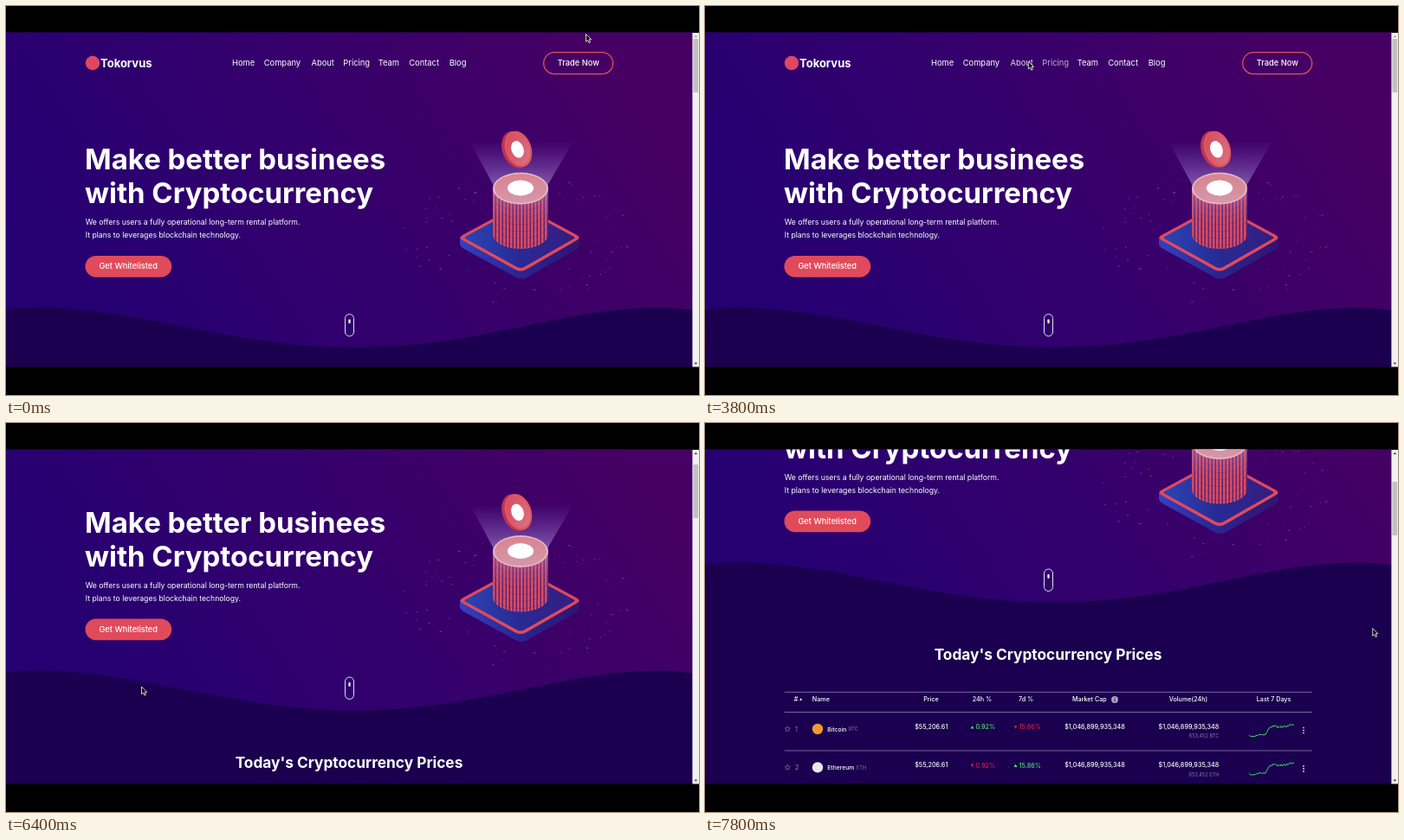
These frames come from a looping animation (800x450 px, 8000 ms). An HTML page:

```html
<!DOCTYPE html>
<html lang="en">
<head>
<meta charset="utf-8">
<title>Crypto landing page</title>
<style>
  html, body { margin: 0; width: 100%; height: 100%; overflow: hidden; background: #000; }
  svg { display: block; width: 800px; height: 450px; }
  text { font-family: Inter, "Open Sans", sans-serif; fill: #fff; }
  .nav text { font-size: 9.4px; }
  .title { font-size: 32.95px; font-weight: 700; }
  .lead { font-size: 8.69px; }
  .label { font-size: 9.25px; font-weight: 500; text-anchor: middle; }
  .table text { font-size: 7.2px; font-weight: 500; }
  .table .name { font-size: 6.75px; }
  .table .small { font-size: 5.6px; font-weight: 400; fill: #8678ab; }
  .table .mid { text-anchor: middle; }
  .table .end { text-anchor: end; }
  .table .up { fill: #4fe06c; }
  .table .down { fill: #d51f49; }
</style>
</head>
<body>
<svg viewBox="0 0 800 450">
  <defs>
    <clipPath id="view"><rect y="30.6" width="793" height="387"/></clipPath>
    <linearGradient id="sky" gradientUnits="userSpaceOnUse" x1="90" y1="390" x2="660" y2="10">
      <stop offset="0" stop-color="#240072"/>
      <stop offset=".5" stop-color="#34006c"/>
      <stop offset="1" stop-color="#460063"/>
    </linearGradient>
    <linearGradient id="beam" x2="0" y2="1">
      <stop offset="0" stop-color="#a98af0" stop-opacity=".02"/>
      <stop offset="1" stop-color="#cdbcf5" stop-opacity=".5"/>
    </linearGradient>
    <linearGradient id="haze" x2="0" y2="1">
      <stop offset="0" stop-color="#b9a0d8" stop-opacity=".4"/>
      <stop offset=".6" stop-color="#8a60b0" stop-opacity="0"/>
    </linearGradient>
    <linearGradient id="deck">
      <stop offset="0" stop-color="#2a44b4"/>
      <stop offset=".5" stop-color="#282a94"/>
      <stop offset="1" stop-color="#351c80"/>
    </linearGradient>
    <linearGradient id="side">
      <stop offset="0" stop-color="#3440c0"/>
      <stop offset=".5" stop-color="#2a2490"/>
      <stop offset="1" stop-color="#301470"/>
    </linearGradient>
    <linearGradient id="coin" x2=".7" y2="1">
      <stop offset="0" stop-color="#d4495c"/>
      <stop offset="1" stop-color="#d97080"/>
    </linearGradient>
    <linearGradient id="lid" x2="0" y2="1">
      <stop offset="0" stop-color="#d9838f"/>
      <stop offset="1" stop-color="#d598ab"/>
    </linearGradient>
    <pattern id="ribs" width="4" height="8" patternUnits="userSpaceOnUse" x="562">
      <rect width="4" height="8" fill="#5c2474"/>
      <rect width="2.5" height="8" fill="#dc4c60"/>
    </pattern>
  </defs>

  <g clip-path="url(#view)">
    <g id="page">
      <rect y="30" width="793" height="641" fill="#1a004e"/>
      <path fill="url(#sky)" d="M0 30H793V352Q772 349 750 349C640 350 545 395 405 395S170 354 52 349Q30 348 0 351Z"/>

      <g id="dust"></g>

      <g stroke-linejoin="round">
        <path d="M524 267V276Q525 279 529 281L589 314Q595 317 601 314L658 282Q662 279 662 276V267Z" fill="url(#side)"/>
        <path d="M527 265L588 232Q593 229 598 232L659 265Q664 268 659 271L600 305Q594 308 588 305L527 271Q522 268 527 265Z" fill="#e04a5c"/>
        <path d="M531 266.5L589 235Q593 233 597 235L655 266.5Q658 268 655 269.5L598 302Q594 304 590 302L531 269.5Q528 268 531 266.5Z" fill="url(#deck)"/>
        <path d="M562 211V264A32 17 0 0 0 626 264V211Z" fill="url(#ribs)"/>
        <g id="seams" fill="none" stroke="#5c2274" stroke-width=".7" opacity=".4"></g>
        <path d="M562 211V264A32 17 0 0 0 626 264V211Z" fill="url(#haze)"/>
        <ellipse cx="594" cy="211" rx="32" ry="18.5" fill="#e6b9c6"/>
        <ellipse cx="594" cy="211" rx="30" ry="16.8" fill="url(#lid)"/>
        <ellipse cx="594" cy="210.5" rx="15" ry="9" fill="#fff"/>
        <path d="M562 211V206L536 158H654L626 206V211A32 18.5 0 0 0 562 211Z" fill="url(#beam)"/>
        <g transform="rotate(-20 590 166)">
          <ellipse cx="588.5" cy="165.5" rx="15.5" ry="22" fill="#b93455"/>
          <ellipse cx="591.5" cy="166" rx="15" ry="21.5" fill="#e25560"/>
          <ellipse cx="591.5" cy="166" rx="12.8" ry="19" fill="url(#coin)"/>
          <ellipse cx="590.5" cy="166" rx="7" ry="10" fill="#fff"/>
        </g>
      </g>

      <circle cx="100" cy="66" r="8.2" fill="#df4760"/>
      <text x="109" y="71" font-size="13" font-weight="700">Tokorvus</text>
      <g id="nav" class="nav"></g>
      <rect x="620.7" y="53.7" width="80" height="25" rx="12.5" fill="none" stroke="#e0515d" stroke-width="1.3"/>
      <text class="label" x="660.8" y="69">Trade Now</text>

      <text class="title" x="91" y="189">Make better businees</text>
      <text class="title" x="91" y="228">with Cryptocurrency</text>
      <text class="lead" x="91.7" y="253.3">We offers users a fully operational long-term rental platform.</text>
      <text class="lead" x="91.7" y="268">It plans to leverages blockchain technology.</text>
      <rect x="91.5" y="289" width="99.7" height="24.7" rx="12.35" fill="#e14a5a"/>
      <text class="label" x="141.2" y="304.3">Get Whitelisted</text>

      <rect x="391.5" y="356.5" width="10" height="25.5" rx="5" fill="none" stroke="#e6dff5"/>
      <rect x="395.4" y="362.5" width="2.2" height="4.8" rx=".8" fill="#fff"/>

      <text x="396" y="461.7" font-size="17.3" font-weight="700" text-anchor="middle">Today's Cryptocurrency Prices</text>
      <g id="table" class="table" transform="translate(0 187.5)"></g>
    </g>
  </g>

  <rect x="792.4" y="31" width="7.6" height="386.5" fill="#f1f1f1"/>
  <rect id="thumb" x="793.5" y="38" width="5.6" height="62" fill="#c1c1c1"/>
  <path id="upArrow" d="M794.3 36.3L796.3 33.8L798.3 36.3Z"/>
  <path d="M794.3 412.6L796.3 415.1L798.3 412.6Z" fill="#505050"/>
  <path id="cursor" d="M0 0V8.7L2 6.9 3.4 10 4.9 9.4 3.6 6.3H6.2Z" fill="#080808" stroke="#fff" stroke-width=".8"/>
</svg>

<script>
const LOOP = 8000, STEP = 100;
const $ = id => document.getElementById(id);

const links = [
  ['Home', 261], ['Company', 297.7], ['About', 352.5], ['Pricing', 389.3],
  ['Team', 429.7], ['Contact', 465.2], ['Blog', 511.7]
];

// [ms, x, y]
const pointer = [
  [0, 669.5, 32.5], [200, 671, 42], [500, 668, 60], [900, 654, 66],
  [1100, 622, 67], [1300, 556, 65], [1500, 510.3, 63.5], [1800, 508.5, 63.5],
  [2200, 485, 64], [2500, 452, 65], [2700, 430, 65.5], [3000, 424.6, 65.2],
  [3200, 418, 65], [3600, 396, 64.5], [3900, 362, 64], [4200, 318, 64],
  [4500, 268, 64], [4600, 266, 65], [4700, 262, 80], [4900, 245.3, 157],
  [5100, 205, 232], [5400, 150, 304], [5500, 150, 304], [5800, 156.5, 305],
  [6400, 156.5, 305], [6600, 235, 298], [6900, 560, 262], [7100, 752, 241],
  [7300, 770.7, 237.5]
];

// [ms, offset]
const scroll = [
  [6100, 0], [6200, 24], [6300, 55], [6400, 62.5],
  [7400, 62.5], [7500, 84], [7600, 138], [7700, 177], [7800, 187.5]
];

function at(track, t, col) {
  const i = track.findIndex(k => k[0] > t);
  if (i < 0) return track[track.length - 1][col];
  if (i === 0) return track[0][col];
  const a = track[i - 1], b = track[i];
  return a[col] + (b[col] - a[col]) * (t - a[0]) / (b[0] - a[0]);
}

function random(seed) {
  return () => (seed = (seed * 16807) % 2147483647) / 2147483647;
}

function drawDust() {
  const rnd = random(77);
  let out = '';
  for (let i = 0; i < 75; i++) {
    const a = rnd() * Math.PI * 2, r = .62 + rnd() * .4;
    const x = 592 + Math.cos(a) * r * 134, y = 270 + Math.sin(a) * r * 74;
    const w = .8 + rnd() * 2;
    out += `<rect x="${x}" y="${y}" width="${w}" height="1.1" fill="${rnd() < .4 ? '#b04a8c' : '#7550b8'}" opacity="${.3 + rnd() * .5}"/>`;
  }
  $('dust').innerHTML = out;
}

function drawSeams() {
  let out = '';
  for (let y = 220; y < 264; y += 8) out += `<path d="M562 ${y}A32 17 0 0 0 626 ${y}"/>`;
  $('seams').innerHTML = out;
}

const label = (x, y, str, cls = '') => `<text x="${x}" y="${y}" class="${cls}">${str}</text>`;
const rule = y => `<path d="M91.7 ${y}H701" stroke="#8e80b6" stroke-width=".8"/>`;

function change(x, y, value, up) {
  const cls = up ? 'up' : 'down';
  const mark = up ? 'l2 -3.4 2 3.4z' : 'm0 -3.4l2 3.4 2 -3.4z';
  return `<path class="${cls}" d="M${x} ${y - .8}${mark}" fill="${up ? '#4fe06c' : '#d51f49'}"/>` + label(x + 6, y, value, cls);
}

function sparkline(x, y) {
  const rnd = random(41);
  let d = '';
  for (let i = 0; i <= 52; i++) {
    const base = 15 - i * .08 - 9 / (1 + Math.exp(22 - i)) + (i > 32 && i < 44 ? 1.4 : 0);
    d += (i ? 'L' : 'M') + (x + i) + ' ' + (y + base + (rnd() - .5) * 2.2).toFixed(1);
  }
  return `<path d="${d}" fill="none" stroke="#45d467" stroke-width="1"/>`;
}

function row(n, y, name, code, color, codeX, dayUp) {
  const star = 'm0 -3.2l.9 2 2.2 .2-1.7 1.5.5 2.2-1.9-1.2-1.9 1.2.5-2.2-1.7-1.5 2.2-.2z';
  const dots = [-3, 0, 3].map(d => `<circle cx="691" cy="${y + 1.5 + d}" r=".85" fill="#fff"/>`).join('');
  const big = '$1,046,899,935,348';
  return `<path d="M95.3 ${y}${star}" fill="none" stroke="#8173a6" stroke-width=".7"/>` +
    `<text x="104" y="${y + 2.5}" style="fill:#9789b9;font-weight:400">${n}</text>` +
    `<circle cx="130" cy="${y}" r="6.2" fill="${color}"/>` +
    label(141.3, y + 2.5, name, 'name') + label(codeX, y + 2.3, code, 'small') +
    label(261.3, y - .4, '$55,206.61', 'mid') +
    change(306.5, y + .4, '0.92%', dayUp) +
    change(356.5, y + .4, '15.86%', !dayUp) +
    label(450, y - .4, big, 'mid') + label(593.3, y - .4, big, 'end') +
    label(593.3, y + 10.3, '653,452 ' + code, 'small end') +
    sparkline(628, y - 7) + dots;
}

function drawTable() {
  const y = 322.1;
  $('table').innerHTML = rule(311.3) + rule(334.5) + rule(379) + rule(423.5) +
    label(102.8, y, '#') + `<path d="M109 ${y - 1.3}l1.6 -2.6 1.6 2.6z" fill="#fff"/>` +
    label(123.8, y, 'Name') +
    [[261, 'Price'], [320, '24h %'], [370.6, '7d %'], [443.8, 'Market Cap'], [558, 'Volume(24h)'], [656.6, 'Last 7 Days']]
      .map(([x, s]) => label(x, y, s, 'mid')).join('') +
    '<circle cx="473" cy="320" r="3.9" fill="#aaa2bd"/><path d="M473 319.4v2.6M473 317.5v1" stroke="#1a004e"/>' +
    row(1, 354, 'Bitcoin', 'BTC', '#f09a2c', 166, true) +
    row(2, 398.4, 'Ethereum', 'ETH', '#e9e8ee', 175, false);
}

function hovered(t, i) {
  const x = at(pointer, t, 1), y = at(pointer, t, 2);
  const left = links[i][1] - 5.2;
  const right = i < links.length - 1 ? links[i + 1][1] - 5.2 : 537;
  return y > 55 && y < 78 && x >= left && x < right;
}

function render(t) {
  const top = at(scroll, t, 1);
  $('page').setAttribute('transform', `translate(0 ${-top})`);
  $('thumb').setAttribute('y', 38 + top * .16);
  $('upArrow').setAttribute('fill', top ? '#505050' : '#a3a3a3');
  $('cursor').setAttribute('transform', `translate(${at(pointer, t, 1)} ${at(pointer, t, 2)})`);
  // links fade over three steps
  navItems.forEach((el, i) => {
    const dim = [0, 1, 2].filter(k => hovered(Math.max(0, t - k * STEP), i)).length / 3;
    el.setAttribute('opacity', 1 - .48 * dim);
  });
}

drawDust();
drawSeams();
drawTable();
$('nav').innerHTML = links.map(([s, x]) => label(x, 69, s)).join('');
const navItems = [...$('nav').children];

const start = performance.now();
function tick() {
  const t = (performance.now() - start) % LOOP;
  render(Math.floor(t / STEP) * STEP);
  requestAnimationFrame(tick);
}
tick();
</script>
</body>
</html>
```
